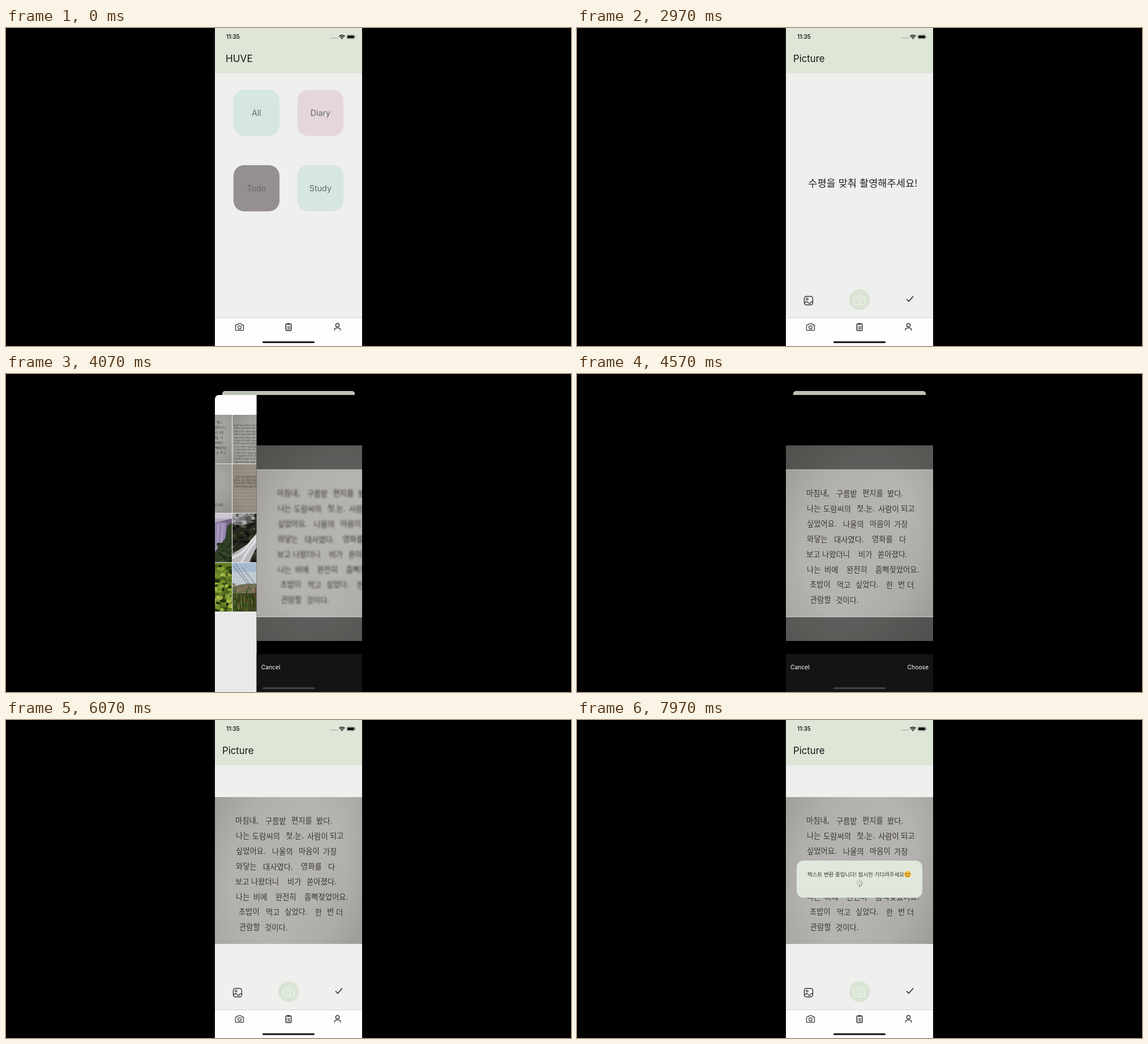
Recreate the animation shown at these times as an HTML page. Size 998 px wide and 561 px high, loop 8000 ms.

```html
<!DOCTYPE html>
<html lang="ko">
<head>
<meta charset="utf-8">
<title>Notes app</title>
<style>
html, body { margin: 0; width: 100%; height: 100%; overflow: hidden; background: #000; }
#stage { display: block; width: 100vw; height: 100vh; }
text { font-family: Inter, "Noto Sans CJK KR", "Noto Sans CJK", sans-serif; white-space: pre; }
.ko { font-family: "Noto Sans CJK KR", "Noto Sans CJK", sans-serif; }
.line { fill: none; stroke-linecap: round; stroke-linejoin: round; }
.soft { filter: blur(.7px); }
</style>
</head>
<body>
<svg id="stage" viewBox="0 0 998 561"></svg>
<script>
const LOOP = 8000, W = 260, H = 561, SHEET_TOP = 37;

// ---- drawing helpers ----
const rect = (x, y, w, h, fill, more = '') =>
  `<rect x="${x}" y="${y}" width="${w}" height="${h}" fill="${fill}" ${more}/>`;
const circle = (x, y, r, fill, more = '') => `<circle cx="${x}" cy="${y}" r="${r}" fill="${fill}" ${more}/>`;
const shape = (d, fill, more = '') => `<path d="${d}" fill="${fill}" ${more}/>`;
const line = (d, color, width, more = '') =>
  `<path class="line" d="${d}" stroke="${color}" stroke-width="${width}" ${more}/>`;
const text = (x, y, size, str, fill = '#222', more = '') =>
  `<text x="${x}" y="${y}" font-size="${size}" fill="${fill}" ${more}>${str}</text>`;
const group = (more, ...parts) => `<g ${more}>${parts.join('')}</g>`;
const mid = 'text-anchor="middle"';

let seed = 7;
const rnd = () => (seed = seed * 16807 % 2147483647) / 2147483647;
const dots = (n, x, y, w, h, r, colors) => Array.from({ length: n }, () =>
  `<ellipse cx="${(x + rnd() * w).toFixed(1)}" cy="${(y + rnd() * h).toFixed(1)}" rx="${(r * (.5 + rnd())).toFixed(1)}" ry="${(r * (.4 + rnd() * .6)).toFixed(1)}" fill="${colors[Math.floor(rnd() * colors.length)]}"/>`).join('');
const blades = (n, x, y, w, h, len, colors) => Array.from({ length: n }, () => {
  const bx = x + rnd() * w, by = y + rnd() * h;
  return line(`M${bx.toFixed(1)} ${by.toFixed(1)}l${(rnd() * 5 - 2).toFixed(1)} ${(-len * (.5 + rnd())).toFixed(1)}`, colors[Math.floor(rnd() * colors.length)], 1.2);
}).join('');

// ---- icons, centred on x, y ----
const camera = (x, y, k, color, width) => group(`transform="translate(${x} ${y}) scale(${k})"`,
  line('M-6 -3.8h2.2l1.4-2h4.8l1.4 2h2.2q1.1 0 1.1 1.1v7.4q0 1.1-1.1 1.1h-12q-1.1 0-1.1-1.1v-7.4q0-1.1 1.1-1.1z', color, width),
  circle(0, .7, 2.9, 'none', `stroke="${color}" stroke-width="${width}"`), circle(4.9, -1.8, .6, color));
const check = (x, y) =>
  line(`M${x - 5} ${y + 1}l3.5 3.5 7.5-8.5`, '#b9beb6', 1.4, 'transform="translate(0 1.2)"') +
  line(`M${x - 5} ${y + 1}l3.5 3.5 7.5-8.5`, '#333', 1.5);
const clipboard = (x, y) =>
  rect(x - 4.7, y - 5.5, 9.4, 11.8, 'none', 'rx="1.2" stroke="#2a2a2a" stroke-width="1.5"') +
  rect(x - 2.5, y - 6.8, 5, 2.8, '#2a2a2a', 'rx=".8"') +
  line(`M${x - 2.3} ${y - 1}h.3m1.6 0h2.6M${x - 2.3} ${y + 1.2}h.3m1.6 0h2.6M${x - 2.3} ${y + 3.4}h.3m1.6 0h2.6`, '#2a2a2a', 1.2);
const person = (x, y) => circle(x, y - 2.9, 3.1, 'none', 'stroke="#333" stroke-width="1.4"') +
  line(`M${x - 5.2} ${y + 6}v-1q0-2.9 3-2.9h4.4q3 0 3 2.9v1`, '#333', 1.4);
const gallery = (x, y) => rect(x - 7.5, y - 7.5, 15, 15, 'none', 'rx="3.6" stroke="#333" stroke-width="1.4"') +
  circle(x - 2.6, y - 2.7, 1.7, 'none', 'stroke="#333" stroke-width="1.2"') +
  line(`M${x - 7} ${y + 4}q4-4.5 7 0q2 2.6 3.4-.6q1.5-3 4-1`, '#333', 1.3);

// ---- handwritten page ----
const NOTE = [
  '36마침내,89구름밭135편지를179봤다.',
  '37나는66도람씨의125첫.눈.163사람이203되고',
  '37싶었어요.101나울의148마음이191가장',
  '37와닿는85대사였다.152영화를200다',
  '36보고64나왔더니128비가162쏟아졌다.',
  '37나는68비에107완전히158흠뻑젖었어요.',
  '42초밥이90먹고123싶었다.177한198번214더',
  '43관람할88것이다.'];
const note = NOTE.map((row, i) => [...row.matchAll(/(\d+)(\D+)/g)].map(([, x, word], j) =>
  text(x, 46 + i * 26.9 + j % 2 * .8, 13.3, word, '#383634', 'class="ko"')).join('')).join('');

const paper = (w, y, h) => rect(0, y, w, h, 'url(#paper)') + rect(0, y, w, h, 'url(#shade)');
const photo = () => paper(W, -43, 345) + '<g class="ink"><use href="#note"/></g>';

const SYL = '오늘은 날이 맑아서 길을 걸었다 작은 나무와 하늘을 보며 천천히 생각을 적어 두었다 ';
const scribble = (n, x, y, step, size, chars) => Array.from({ length: n }, (_, i) => {
  const from = i * 7 % SYL.length;
  return text(x + rnd() * 2, y + i * step, size, (SYL + SYL).substr(from, chars).trim(), '#3b3836', 'class="ko"');
}).join('');

// ---- picker thumbnails, each 86 x 86 ----
const greens = ['#3f5a1c', '#7f9c2c', '#b4c64a', '#25380f', '#94ae3a', '#566f22'];
const scene = (...parts) => group('class="soft"', ...parts);
const thumbs = [
  paper(86, 0, 86) + '<use href="#note" transform="scale(.33)"/>',
  paper(86, 0, 86) + scribble(13, 2, 20, 5.4, 3.7, 27),
  paper(86, 0, 86) + scribble(8, 14, 8, 10.4, 6.4, 11),
  paper(86, 0, 86) +
    ['오늘의할일  모음', 'Kitchen', 'Textbook', 'A1', '새로운이야기 : 작은시작'].map((s, i) => text(17, 29 + i * 11.3, 5.3, s, '#383634', 'class="ko"')).join(''),
  rect(0, 0, 86, 86, '#a79d90') + Array.from({ length: 13 }, (_, i) => rect(0, 8 + i * 6, 86, .5, '#8f7e74')).join('') +
    rect(0, 0, 86, 86, 'url(#shade)') + scribble(4, 2, 25, 5.6, 4, 25),
  scene(rect(0, 0, 86, 86, '#26341d'), dots(60, 0, 0, 86, 12, 3, ['#4c6b3d', '#32492a', '#6b8456']),
    rect(0, 13, 86, 46, '#8d0c5a'), dots(320, 0, 11, 86, 52, 2.6, ['#cf147f', '#b30d70', '#dd3198', '#5c1040', '#26331d']),
    dots(90, 0, 62, 86, 24, 2.6, ['#1f2d18', '#3b5127', '#4b5b31', '#161f11']), dots(7, 3, 46, 50, 12, 2.4, ['#7442a9']),
    circle(25, 73, 7, '#f0a51d'), circle(13, 79, 2.5, '#e88c18'), circle(46, 79, 2.5, '#f0b32a')),
  scene(rect(0, 0, 86, 86, '#c3bacf'), rect(0, 0, 86, 9, '#dcd6e2'),
    shape('M0 17L25 14 49 18 86 9V86H0z', '#7d6c8a'), shape('M0 20Q30 20 44 34L47 68 0 62z', '#6f6370'),
    shape('M47 19Q62 14 76 16L73 62Q60 68 47 66z', '#a595c3'), line('M53 22L52 62M62 20L60 62M70 20L67 58', '#c9bbdc', 1.6),
    shape('M28 70Q44 60 60 66L62 78 40 80z', '#9a8db0'), shape('M0 50Q20 58 30 70L46 76 56 86H0z', '#3a442d'),
    shape('M86 16L78 22 74 44 56 68 48 86H86z', '#35442a'),
    dots(60, 0, 62, 42, 24, 3, ['#44502f', '#2b3720', '#505a3c']), dots(50, 62, 52, 24, 34, 3, ['#2a3c1f', '#425532', '#202e18'])),
  scene(rect(0, 0, 86, 86, '#2a2a22'), dots(110, 0, 0, 86, 86, 4, ['#3a392c', '#4c4929', '#191b17', '#5e5b4b', '#121310']),
    shape('M0 0H40L30 16 18 22 0 18z', '#8f9394'), dots(25, 0, 0, 38, 18, 4, ['#b5b8b8', '#5d605d', '#7c7f7e']),
    shape('M86 2Q68 8 57 24Q40 34 31 51L0 72V86H30Q42 56 57 42Q72 34 86 22z', '#c6c9cc'),
    line('M80 8Q56 30 41 48T16 86M61 28Q38 40 28 56T0 78', '#eef0f1', 4), dots(60, 46, 50, 40, 36, 3, ['#5a621f', '#3a4617', '#766c29', '#1d200f'])),
  scene(rect(0, 0, 86, 86, '#6d8ca6'), rect(0, 10, 86, 30, '#b9b6ab'), shape('M0 0L22 4 36 22 48 26V46H0z', '#2b2820'),
    shape('M42 22Q60 14 86 20V42H42z', '#d6cbb8'), line('M50 24V40M60 21V40M72 21V41', '#efe7d8', 3),
    rect(36, 41, 50, 24, '#a3988a'), shape('M0 38Q22 40 36 54L60 62 86 66V86H0z', '#392c17'),
    dots(110, 0, 48, 56, 38, 2.8, ['#5d5424', '#48331a', '#221b10', '#6b6428']), dots(40, 50, 68, 36, 18, 2.8, ['#4c3720', '#2c2115']),
    dots(30, 12, 34, 22, 22, 2, ['#5c6b28', '#3c481c'])),
  scene(rect(0, 0, 86, 86, '#6d8728'), dots(240, 0, 0, 86, 86, 4.5, greens), dots(25, 0, 0, 16, 50, 3, ['#7d827a', '#a7b69a']),
    line('M26 0Q40 22 43 86', '#3c4d18', 1.5), shape('M36 29Q49 31 46 59Q34 58 33 45z', '#e0b62a'), shape('M28 6Q44 2 50 16Q36 24 28 6z', '#a9c44a')),
  scene(rect(0, 0, 86, 86, '#b4cbe0'), rect(0, 16, 86, 26, '#d0dae2'), shape('M0 42Q20 36 40 37Q62 24 86 31V86H0z', '#7c7b5c'),
    dots(90, 0, 38, 86, 18, 2.6, ['#8f8468', '#68754b', '#8c7060', '#566440']), rect(0, 54, 86, 32, '#3e4d20'),
    blades(130, 0, 58, 86, 30, 10, ['#7b3b2a', '#5c7c2b', '#38501c', '#82863f', '#253514']),
    line('M0 4L26 37M4 0L32 40M17 8L40 38', '#4b5356', .7), circle(57, 57, 5, '#f0ead0'), circle(57, 57, 1.8, '#e8d87a'))
].map((art, i) => `<svg x="${i % 3 * 87}" y="${35 + Math.floor(i / 3) * 87}" width="86" height="86">${art}</svg>`).join('');

// ---- screens ----
const tile = (x, y, fill, label, color = '#666a69') =>
  rect(x, y, 81.5, 81.5, fill, 'rx="19"') + text(x + 40.7, y + 46, 14.3, label, color, mid);

const categories = group('id="categories"',
  text(19, 59.5, 17.2, 'HUVE', '#161616'),
  tile(32.7, 109, '#d6e6e1', 'All'), tile(145.7, 109, '#e5d6de', 'Diary'),
  tile(32.7, 242, '#958f92', 'Todo', '#6b686a'), tile(145.7, 242, '#d6e6e1', 'Study'),
  group('id="editBox"',
    rect(27, 392.5, 206.5, 96.5, '#dde6d8', 'rx="10"'),
    text(130, 420.3, 9.4, '카테고리를 수정하세요!', '#333', `class="ko" ${mid} font-weight="500"`),
    text(52, 440, 10, 'Diary', '#a2a99f', 'font-weight="300"'),
    rect(52, 443, 156, 1, '#a9a8ae'),
    line('M96 461.5h-11m4.5-4.5l-4.5 4.5 4.5 4.5', '#333', 1.4), check(166.5, 461)));

const spokes = Array.from({ length: 8 }, (_, i) =>
  `<line class="spoke" x1="130" y1="285.4" x2="130" y2="282.4" stroke="#777c76" stroke-width="1.4" stroke-linecap="round" transform="rotate(${i * 45} 130 288.3)"/>`).join('');

const emoji = circle(215, 272.3, 6, '#f4bd3c') +
  line('M211 270l2.4 1.2-2.4 1M219 270l-2.4 1.2 2.4 1M212.6 275.7q2.4-2 4.8 0', '#70451a', .9);

const picture = group('id="picture"',
  text(13, 59.5, 16.8, 'Picture', '#161616'),
  text(136, 280, 17.6, '수평을 맞춰 촬영해주세요!', '#222', `id="prompt" class="ko" ${mid}`),
  `<svg id="shot" x="0" y="136" width="260" height="259">${photo()}</svg>`,
  gallery(40, 481), circle(130, 479.3, 18.3, '#d9e4d4'), camera(130, 480, 1.35, '#f3f6f1', 1), check(218.5, 477.5),
  group('id="waitBox"',
    rect(19, 248, 222, 65.5, '#dfe8db', 'rx="12"'),
    text(38, 275.8, 9.5, '텍스트 변환 중입니다! 잠시만 기다려주세요', '#333', 'class="ko"'),
    emoji, spokes));

const card = group('id="card"',
  rect(0, 0, W, H, '#efefee'), rect(0, 0, W, 80, '#dde6d7'),
  categories, picture,
  rect(0, 511.5, W, 50, '#fdfdfd'), rect(0, 511, W, 1, '#d5d5da'),
  camera(43.5, 527.5, 1, '#333', 1.2), clipboard(130, 527.5), person(216.5, 527.3),
  rect(0, 0, W, H, '#000', 'id="cardDim"'));

const picker = group('id="picker"',
  rect(0, 0, W, H, '#fdfdfd'), thumbs,
  rect(0, 35, W, H, '#000', 'id="pickerDim"'),
  group('id="bar"',
    text(12.5, 21.5, 10.2, '취소', '#2f7cf0', 'class="ko"'),
    rect(89, 8, 82, 20, '#e3e3e5', 'rx="5"'), rect(90.5, 9.3, 38, 17.4, '#fff', 'rx="4.5" stroke="#d8d8da" stroke-width=".5"'),
    text(109.3, 20.9, 7.9, 'Photos', '#111', `${mid} font-weight="600"`),
    text(150.5, 20.9, 7.9, 'Albums', '#111', `${mid} font-weight="500"`)));

const editor = group('id="editor"',
  rect(0, 0, W, H, '#000'),
  group('transform="translate(0 132)"', photo(),
    rect(0, -43, W, 43, '#000', 'opacity=".48"'), rect(0, 259.5, W, 43, '#000', 'opacity=".48"'),
    rect(0, -.5, W, .8, '#ddd'), rect(0, 259, W, .8, '#ddd')),
  rect(0, 457, W, 110, '#141414'),
  text(8, 484, 10.3, 'Cancel', '#fff'), text(252, 484, 10.3, 'Choose', '#fff', 'text-anchor="end"'));

const status = text(20, 19, 9.9, '11:35', '#1c1c1c', 'font-weight="600"') +
  [206, 209.3, 212.6, 215.9].map(x => circle(x, 17.7, .9, '#8f978c')).join('') +
  line('M219.8 14.2q4.6-3.6 9.2 0M221.6 16.2q2.8-2 5.6 0', '#111', 1.5) + circle(224.4, 18.2, 1.2, '#111') +
  rect(233, 12.2, 14, 6.8, 'none', 'rx="2" stroke="#777" stroke-width=".7"') +
  rect(234, 13.2, 12, 4.8, '#111', 'rx="1.2"') + rect(247.8, 14.4, .9, 2.4, '#777');

const stage = document.getElementById('stage');
stage.innerHTML = `<defs>
  <clipPath id="phone"><rect width="260" height="561"/></clipPath>
  <clipPath id="cardClip"><rect id="cardEdge" width="260" height="620"/></clipPath>
  <clipPath id="sheetClip"><rect width="260" height="620" rx="7"/></clipPath>
  <linearGradient id="paper" x2="1" y2=".8"><stop offset="0" stop-color="#a8a6a1"/><stop offset=".35" stop-color="#b4b2ae"/>
    <stop offset=".65" stop-color="#b6b4b0"/><stop offset="1" stop-color="#a9a7a3"/></linearGradient>
  <radialGradient id="shade" r=".8"><stop offset=".5" stop-color="#55534d" stop-opacity="0"/><stop offset="1" stop-color="#55534d" stop-opacity=".22"/></radialGradient>
  <g id="note">${note}</g></defs>` +
  rect(0, 0, 998, 561, '#000') +
  group('transform="translate(369 0)"', group('clip-path="url(#phone)"',
    group('clip-path="url(#cardClip)"', card, status),
    group('id="sheet"', group('clip-path="url(#sheetClip)"', picker, editor)),
    rect(84, 552.8, 92, 3, '#111', 'id="home" rx="1.5"')));

// ---- motion ----
const $ = id => document.getElementById(id);
const el = Object.fromEntries(['card', 'cardEdge', 'cardDim', 'categories', 'editBox', 'picture', 'prompt', 'shot',
  'waitBox', 'sheet', 'picker', 'pickerDim', 'bar', 'editor', 'home'].map(id => [id, $(id)]));
const ink = el.editor.querySelector('.ink');
const spinner = [...document.querySelectorAll('.spoke')];

const AT = { editIn: 700, editOut: 1630, tab: 1850, sheet: 3330, push: 3987, sharp: 4260, dismiss: 5248, shot: 5520, wait: 7010 };
const ramp = (t, from, ms) => Math.min(1, Math.max(0, (t - from) / ms));
// critically damped spring
const spring = (t, from) => {
  const x = Math.max(0, t - from) * .03;
  return 1 - (1 + x) * Math.exp(-x);
};
const show = (node, on) => node.setAttribute('display', on ? 'inline' : 'none');
const fade = (node, o) => node.setAttribute('opacity', o.toFixed(3));
const move = (node, x, y) => node.setAttribute('transform', `translate(${x.toFixed(2)} ${y.toFixed(2)})`);

function render(t) {
  show(el.categories, t < AT.tab);
  show(el.picture, t >= AT.tab);
  fade(el.editBox, ramp(t, AT.editIn, 150) - ramp(t, AT.editOut, 150));
  show(el.prompt, t < AT.shot);
  show(el.shot, t >= AT.shot);
  fade(el.waitBox, ramp(t, AT.wait, 150));

  // the page shrinks back while the sheet is up
  const up = spring(t, AT.sheet) - spring(t, AT.dismiss);
  const open = up > .001;
  const back = open ? `translate(${13 * up} ${30 * up}) scale(${1 - .1 * up})` : '';
  el.card.setAttribute('transform', back);
  el.cardEdge.setAttribute('transform', back);
  el.cardEdge.setAttribute('rx', open ? 20 - 14 * up : 0);
  fade(el.cardDim, .16 * up);
  show(el.sheet, open);
  move(el.sheet, 0, SHEET_TOP + (H - SHEET_TOP) * (1 - up));

  const push = spring(t, AT.push);
  move(el.picker, -78 * push, 0);
  move(el.editor, W * (1 - push), 0);
  show(el.editor, push > 0);
  show(el.picker, push < .999);
  fade(el.pickerDim, .11 * push);
  fade(el.bar, Math.max(0, 1 - 1.5 * push));
  const blur = 1.4 * (1 - ramp(t, AT.sharp, 60));
  ink.style.filter = blur ? `blur(${blur}px)` : 'none';
  el.home.setAttribute('fill', push > .3 && t < AT.dismiss ? '#45434c' : '#111');

  const step = Math.floor(t / 60) % 8;
  spinner.forEach((s, i) => fade(s, 1 - (step - i + 8) % 8 * .11));
}

function frame(now) {
  render(now % LOOP);
  requestAnimationFrame(frame);
}
render(0);
requestAnimationFrame(frame);
</script>
</body>
</html>
```
